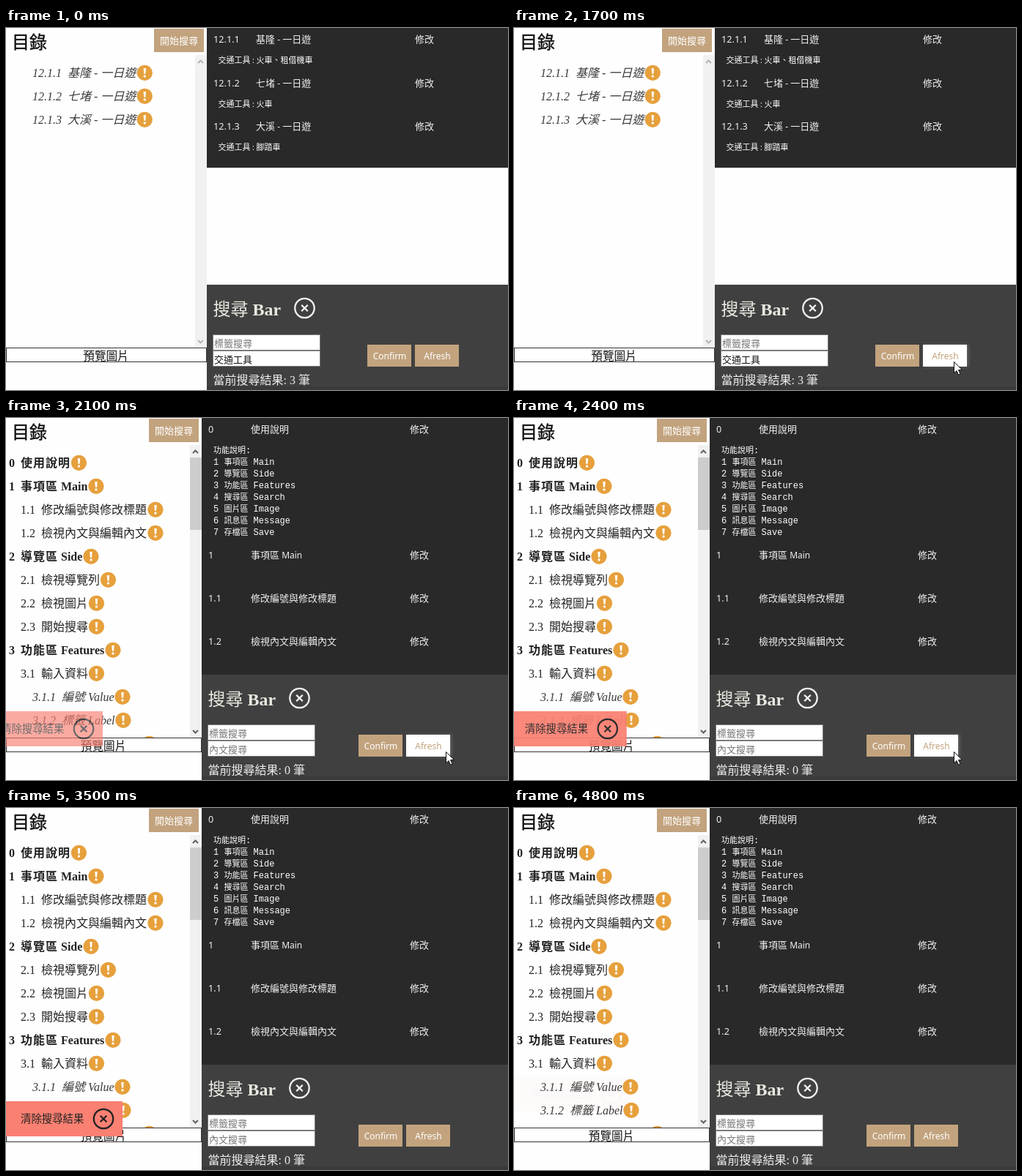
Write an HTML page that moves like this. It is 685 px wide and 495 px high and loops after 4900 ms.

```html
<!DOCTYPE html>
<html lang="zh-Hant">
<head>
<meta charset="utf-8">
<title>目錄搜尋</title>
<style>
  html, body { margin: 0; width: 100%; height: 100%; overflow: hidden; background: #fefefe; }
  svg { display: block; }
  text { white-space: pre; }
  .serif { font-family: "Liberation Serif", "Noto Sans CJK TC", "Noto Sans CJK", serif; }
  .sans { font-family: "Noto Sans", "Noto Sans CJK TC", "Noto Sans CJK", sans-serif; }
  .mono { font-family: "Liberation Mono", "Noto Sans CJK TC", "Noto Sans CJK", monospace; }
  .bold { font-weight: bold; }
  .italic { font-style: italic; }
  .title { font-weight: bold; }
  .title tspan { font-weight: 400; }
</style>
</head>
<body>
<svg id="stage" width="685" height="495" viewBox="0 0 685 495"></svg>
<script>
const TAN = [194, 163, 126], WHITE = [255, 255, 255];
const rgb = c => `rgb(${c.map(Math.round)})`;
const mix = (a, b, p) => rgb(a.map((v, i) => v + (b[i] - v) * p));

const rect = (x, y, w, h, fill, extra = '') =>
  `<rect x="${x}" y="${y}" width="${w}" height="${h}" fill="${fill}" ${extra}/>`;

// Chinese runs get their own size and spacing inside a Latin line.
function text(x, y, str, cls, size, fill, { cjk = size, gap = 0, extra = '' } = {}) {
  const body = str.replace(/[\u3000-\u9fff]+/g,
    run => `<tspan font-size="${cjk}" letter-spacing="${gap}">${run}</tspan>`);
  return `<text x="${x}" y="${y}" class="${cls}" font-size="${size}" fill="${fill}" ${extra}>${body}</text>`;
}

const badge = (x, y) => `<g transform="translate(${x} ${y})">
  <circle r="10.6" fill="#e6a03c"/>
  <path d="M-1.7-6.3h3.4l-.6 7.8h-2.2z" fill="#fff"/><circle cy="4.6" r="1.7" fill="#fff"/></g>`;

const closeIcon = (x, y, color) => `<g transform="translate(${x} ${y})" fill="none" stroke="${color}" stroke-width="2.3">
  <circle r="13.2"/><path d="M-4.3-4.3 4.3 4.3M4.3-4.3-4.3 4.3"/></g>`;

const box = (x, y, w, h, stroke) =>
  rect(x + .5, y + .5, w - 1, h - 1, '#fff', `stroke="${stroke}"`);

const chevron = (x, y, dir, color) =>
  `<path d="M${x - 3.5} ${y + 2 * dir}l3.5 ${-3.5 * dir} 3.5 ${3.5 * dir}" fill="none" stroke="${color}" stroke-width="2"/>`;

// Outline entries: [indent level, number, title, badge x]
function outline(entries) {
  return entries.map(([level, number, title, badgeX], i) => {
    const y = 61 + 32 * i;
    const style = ['bold', '', 'italic'][level];
    return text(4 + 16 * level, y + 6, `${number}\u00a0\u00a0${title}`, 'serif ' + style, 16,
      level == 2 ? '#3a3a3a' : '#222', { gap: level ? 0 : 1 }) + badge(badgeX, y + .3);
  }).join('');
}

const row = (left, y, number, title) =>
  text(left + 9, y, number, 'sans', 12.7, '#f0f0f0') +
  text(left + 67, y, title, 'sans', 12, '#f0f0f0', { cjk: 13 }) +
  text(left + 284, y, '修改', 'sans', 13, '#f0f0f0');

// Everything the two layouts share; `left` is the edge of the right pane.
function page({ left, entries, bar, content, darkHeight, query, queryColor, count, confirmX }) {
  const input = (y, str, color) => box(left + 8, y, 147, 22, '#7a7a7a') +
    text(left + 10, y + 17, str, 'sans', 13, color);
  return rect(0, 0, 685, 495, '#fefefe') +
    text(8, 28, '目錄', 'serif title', 24, '#111', { extra: 'stroke="#111" stroke-width=".4"' }) +
    rect(left - 72, 1, 68, 32, rgb(TAN)) +
    text(left - 64, 22, '開始搜尋', 'sans', 13, '#fff') +
    `<g clip-path="url(#listArea)">${outline(entries)}</g>` +
    rect(left - 16, 37, 16, 400, '#f1f1f1') + bar +
    box(0, 437, left, 20, '#333') +
    text(left / 2 - .5, 454, '預覽圖片', 'serif', 15.6, '#111', { extra: 'text-anchor="middle"' }) +
    rect(left, 0, 685 - left, darkHeight, '#292929') + content +
    rect(left, 351, 685 - left, 144, '#404040') +
    rect(left, 490, 685 - left, 5, '#3a3a3a') +
    text(left + 8.5, 393, '搜尋 Bar', 'serif title', 24, '#e8e8e0') +
    closeIcon(left + 133.5, 383, '#f2f2f2') +
    input(419, '標籤搜尋', '#777') + input(441, query, queryColor) +
    text(left + 8.5, 487, `當前搜尋結果: ${count} 筆`, 'serif', 16, '#ececec') +
    rect(confirmX, 433, 60, 30, rgb(TAN)) +
    text(confirmX + 30.5, 453, 'Confirm', 'sans', 12, '#fff', { extra: 'text-anchor="middle"' });
}

const trips = [['12.1.1', '基隆', '火車、租借機車'], ['12.1.2', '七堵', '火車'], ['12.1.3', '大溪', '腳踏車']];
const results = page({
  left: 274, darkHeight: 191, query: '交通工具', queryColor: '#111', count: 3, confirmX: 493,
  entries: trips.map(([number, place]) => [2, number, place + ' - 一日遊', 189.3]),
  bar: chevron(265.5, 46, 1, '#b4b4b4') + chevron(265.5, 429, -1, '#b4b4b4'),
  content: trips.map(([number, place, vehicle], i) => {
    const y = 20 + 59.5 * i;
    return row(274, y, number, place + ' - 一日遊') +
      text(289.5, y + 28, '交通工具 : ' + vehicle, 'sans', 10, '#fff', { cjk: 11 });
  }).join('')
});

const guide = ['功能說明:', '1 事項區 Main', '2 導覽區 Side', '3 功能區 Features',
  '4 搜尋區 Search', '5 圖片區 Image', '6 訊息區 Message', '7 存檔區 Save'];
const contents = page({
  left: 267, darkHeight: 495, query: '內文搜尋', queryColor: '#777', count: 0, confirmX: 481,
  entries: [
    [0, '0', '使用說明', 99.5], [0, '1', '事項區 Main', 123],
    [1, '1.1', '修改編號與修改標題', 204], [1, '1.2', '檢視內文與編輯內文', 204],
    [0, '2', '導覽區 Side', 116], [1, '2.1', '檢視導覽列', 139.5],
    [1, '2.2', '檢視圖片', 123.5], [1, '2.3', '開始搜尋', 123.5],
    [0, '3', '功能區 Features', 146], [1, '3.1', '輸入資料', 123.5],
    [2, '3.1.1', '編號 Value', 159], [2, '3.1.2', '標籤 Label', 160],
    [2, '', '', 195.5]
  ],
  bar: rect(251, 54, 16, 99, '#cdcdcd') +
    chevron(258.5, 46, 1, '#606060') + chevron(258.5, 429, -1, '#606060'),
  content: row(267, 20, '0', '使用說明') + row(267, 192, '1', '事項區 Main') +
    row(267, 251, '1.1', '修改編號與修改標題') + row(267, 310, '1.2', '檢視內文與編輯內文') +
    guide.map((line, i) => text(283, 48 + 16 * i, line, 'mono', 12, '#fff', { cjk: 11 })).join('')
});

const stage = document.getElementById('stage');
stage.innerHTML = `
  <defs>
    <clipPath id="listArea"><rect y="37" width="267" height="400"/></clipPath>
    <filter id="glow" x="-20%" y="-40%" width="140%" height="180%"><feGaussianBlur stdDeviation="2"/></filter>
  </defs>
  <g id="results">${results}</g>
  <g id="contents">${contents}</g>
  <g id="afresh">
    <rect id="halo" x="2" y="433" width="60" height="30" fill="#fff" filter="url(#glow)"/>
    <rect id="face" y="433" width="60" height="30"/>
    <text id="label" class="sans" x="30.5" y="453" font-size="12" text-anchor="middle">Afresh</text>
  </g>
  <g id="toast">${rect(0, 401, 159, 48, '#fa8072') +
    text(20, 430, '清除搜尋結果', 'sans', 14.4, '#222') + closeIcon(133, 425, '#222')}</g>
  <path id="cursor" d="M.5.5v15.4l3.5-3.3 2.5 5.6 2.5-1.1-2.5-5.5h4.9z" fill="#fff" stroke="#111"/>`;
const [resultsPage, contentsPage, afresh, halo, face, label, toast, cursor] =
  ['results', 'contents', 'afresh', 'halo', 'face', 'label', 'toast', 'cursor'].map(id => document.getElementById(id));

// The CSS "ease" curve: cubic-bezier(.25, .1, .25, 1)
function ease(x) {
  if (x <= 0) return 0;
  if (x >= 1) return 1;
  let lo = 0, hi = 1;
  for (let i = 0; i < 24; i++) {
    const s = (lo + hi) / 2;
    if (.75 * s * (1 - s) + s ** 3 < x) lo = s; else hi = s;
  }
  return .3 * lo * (1 - lo) ** 2 + 3 * lo * lo * (1 - lo) + lo ** 3;
}

const LOOP = 4900, STEP = 100, RESET = 1900;
const arrival = [[678, 115], [663, 203], [648, 248], [635, 291], [624, 335], [616, 398], [606, 441], [600, 456]];
const departure = [[624, 456], [649, 455], [671, 455]];

function cursorAt(t) {
  if (t < 200 || t >= 3500) return null;
  if (t >= 3200) return departure[(t - 3200) / STEP];
  return arrival[Math.min((t - 200) / STEP, arrival.length - 1)];
}

const show = (el, on) => el.setAttribute('display', on ? 'inline' : 'none');
const move = (el, x, y) => el.setAttribute('transform', `translate(${x} ${y})`);

function draw(t) {
  const reset = t >= RESET;
  show(resultsPage, !reset);
  show(contentsPage, reset);

  const hover = ease((t - 750) / 300) - ease((t - 3150) / 300);
  move(afresh, reset ? 546 : 558, 0);
  halo.setAttribute('opacity', .2 * hover);
  face.setAttribute('fill', mix(TAN, WHITE, hover));
  label.setAttribute('fill', mix(WHITE, TAN, hover));

  const enter = ease((t - 1715) / 1000), leave = ease((t - 4000) / 1000);
  show(toast, reset);
  move(toast, -79.5 * (1 - enter), -35 * leave);
  toast.setAttribute('opacity', enter * (1 - leave));

  const at = cursorAt(t);
  show(cursor, at);
  if (at) move(cursor, ...at);
}

const start = performance.now();
function tick() {
  const t = (performance.now() - start) % LOOP;
  draw(Math.floor(t / STEP) * STEP);
  requestAnimationFrame(tick);
}
tick();
</script>
</body>
</html>
```
